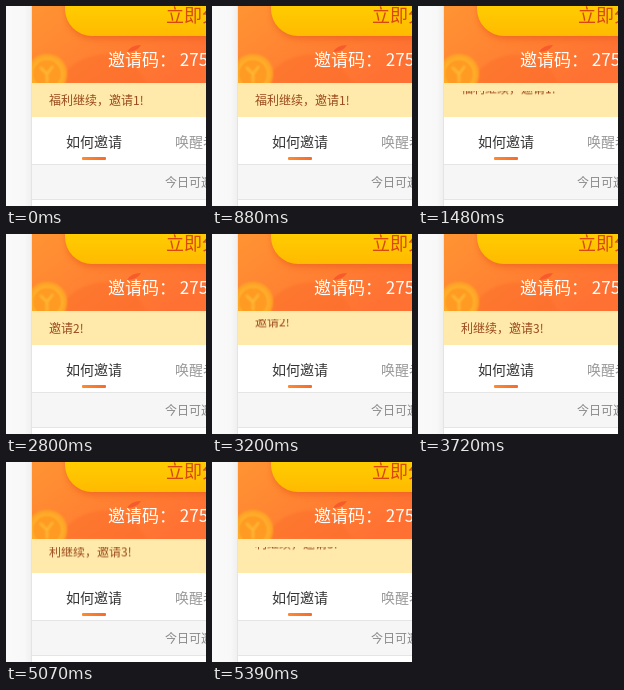
These frames come from a looping animation (200x200 px, 5490 ms). An HTML page:

```html
<!DOCTYPE html>
<html lang="zh-CN">
<head>
<meta charset="utf-8">
<style>
html, body { margin: 0; width: 100%; height: 100%; overflow: hidden; background: #fff; }
body, text { font-family: "Noto Sans CJK SC", "Noto Sans CJK", sans-serif; }
svg { position: absolute; left: 0; top: 0; }
#ticker { position: absolute; left: 43px; top: 85px; width: 157px; height: 18px; overflow: hidden; }
#line { font-size: 12px; line-height: 18px; white-space: pre; color: #9a4a1c; will-change: transform; }
</style>
</head>
<body>
<svg width="200" height="200" viewBox="0 0 200 200">
  <defs>
    <linearGradient id="banner" x2="1" y2=".6">
      <stop offset="0" stop-color="#ff9432"/>
      <stop offset="1" stop-color="#ff7133"/>
    </linearGradient>
    <linearGradient id="button" x2="0" y2="1">
      <stop offset="0" stop-color="#ffdc00"/>
      <stop offset="1" stop-color="#ffba00"/>
    </linearGradient>
    <linearGradient id="bar">
      <stop offset="0" stop-color="#ff8a2c"/>
      <stop offset="1" stop-color="#f96a2a"/>
    </linearGradient>
    <linearGradient id="side">
      <stop offset="0" stop-color="#fafafa"/>
      <stop offset=".75" stop-color="#f8f8f8"/>
      <stop offset="1" stop-color="#f0f0f0"/>
    </linearGradient>
    <filter id="soft" x="-30%" y="-30%" width="160%" height="160%"><feGaussianBlur stdDeviation="1"/></filter>
    <filter id="shade" x="-10%" y="-50%" width="120%" height="200%"><feGaussianBlur stdDeviation="3"/></filter>
    <clipPath id="top"><path d="M26 0H200V77H26z"/></clipPath>
  </defs>
  <path fill="url(#side)" d="M0 0H25V200H0z"/>
  <path fill="#e4e4e4" d="M25 0h1v200h-1z"/>
  <g clip-path="url(#top)">
    <path fill="url(#banner)" d="M26 0H200V77H26z"/>
    <path fill="#fb6a2c" opacity=".4" filter="url(#soft)" d="M52 77C62 57 84 46 106 49S134 66 140 77z"/>
    <g filter="url(#soft)">
      <circle cx="41" cy="68" r="20" fill="#ffa526"/>
      <circle cx="41" cy="68" r="15" fill="#ff9a20" stroke="#ffb732" stroke-width="1.5"/>
      <path d="M34 61l7 7 6-8M41 68v9" fill="none" stroke="#ffb834" stroke-width="2.5"/>
    </g>
    <path fill="#f4502a" opacity=".75" d="M121 46Q125 39 135 39Q131 46 121 46z"/>
    <rect x="60" y="-24" width="180" height="57" rx="27" fill="#e8581c" opacity=".6" filter="url(#shade)"/>
    <rect x="59" y="-24" width="180" height="54" rx="27" fill="url(#button)"/>
  </g>
  <text x="160" y="16" font-size="18" fill="#d9480f">立即分享</text>
  <text x="102" y="60" font-size="17" fill="#fff" xml:space="preserve">邀请码： 275</text>
  <path fill="#ffe9ab" d="M26 77H200V111H26z"/>
  <text x="60" y="141" font-size="14" font-weight="500" fill="#333">如何邀请</text>
  <text x="169" y="141" font-size="14" fill="#999">唤醒老友</text>
  <rect x="76" y="151" width="24" height="3" rx="1" fill="url(#bar)"/>
  <path fill="#f6f6f6" d="M26 158H200V194H26z"/>
  <path fill="#e5e5e5" d="M26 158H200v1H26zM26 193H200v1H26z"/>
  <text x="159" y="181" font-size="12" fill="#888">今日可邀请</text>
</svg>
<div id="ticker"><div id="line"></div></div>
<script>
const LOOP = 5490, RISE = 16, DURATION = 960;
// each message rests, rises from "leave", and is swapped at "end"
const messages = [
  { text: "福利继续，邀请1!", leave: 855, end: 1760 },
  { text: "邀请2!", leave: 2775, end: 3720 },
  { text: "利继续，邀请3!", leave: 4725, end: LOOP }
];
const line = document.getElementById("line");
const swing = p => 0.5 - Math.cos(Math.PI * p) / 2;
const start = performance.now();

function draw(now) {
  const t = Math.max(0, now - start) % LOOP;
  const m = messages.find(item => t < item.end);
  const p = Math.min(1, Math.max(0, (t - m.leave) / DURATION));
  if (line.textContent !== m.text) line.textContent = m.text;
  line.style.transform = `translateY(${-RISE * swing(p)}px)`;
  requestAnimationFrame(draw);
}
draw(start);
</script>
</body>
</html>
```
